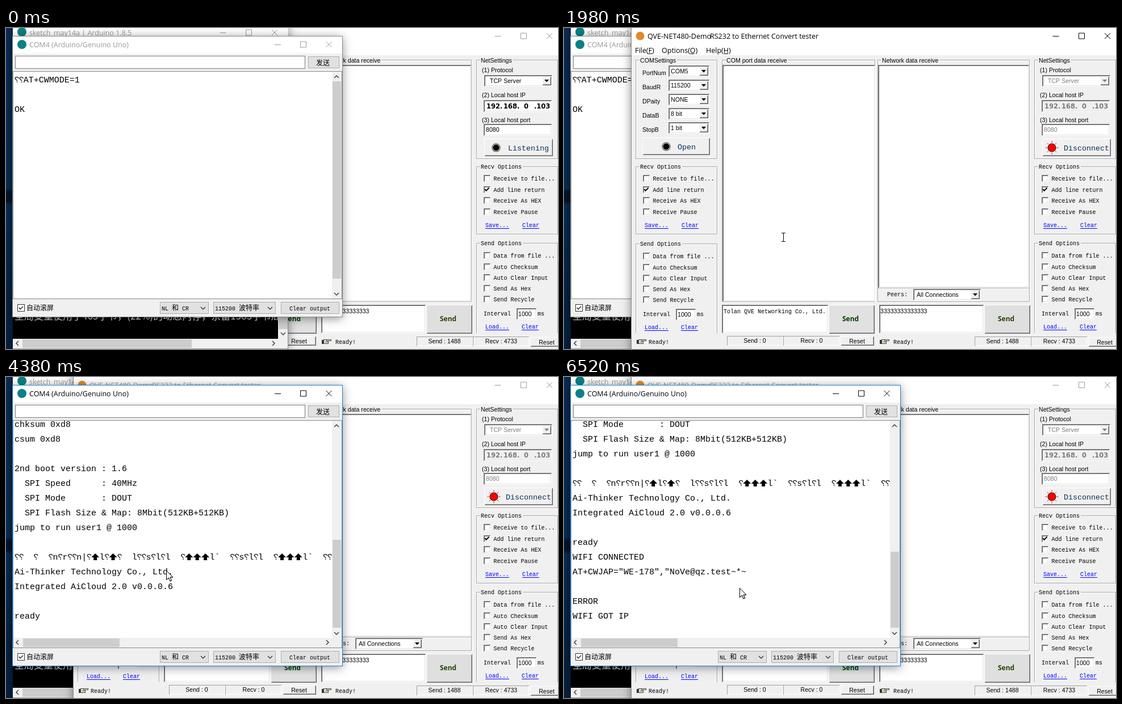
These frames come from a looping animation (972x566 px, 8000 ms). An HTML page with a canvas:

```html
<!DOCTYPE html>
<html lang="en">
<head>
<meta charset="utf-8">
<title>Serial monitor and network tester</title>
<style>
  html, body { margin: 0; width: 100%; height: 100%; overflow: hidden; background: #f0f0f0; }
  canvas { display: block; }
</style>
</head>
<body>
<canvas id="stage" width="972" height="566"></canvas>
<script>
const ctx = document.getElementById('stage').getContext('2d');
const LOOP = 8000, FACE = '#f0f0f0', GREY = '#9a9a9a', TEAL = '#0b8089';
const UI = '12.5px "Open Sans", sans-serif';
const SANS = '10.6px "Liberation Sans", sans-serif';
const MONO = '10px "Liberation Mono", monospace';
const MID = '13.33px "Liberation Mono", monospace';
const LOG = '15px "Liberation Mono", monospace';
const HEAVY = '11.5px "DejaVu Sans", sans-serif';
const cjk = size => size + 'px "Noto Sans CJK SC", "Noto Sans CJK", sans-serif';

const GO_LISTEN = 1140, LISTENING = 1220, BOOT = 2300, GO_MONITOR = 2610, RELEASED = 2680;

const bootLog = [
  'chksum 0xe8', 'load 0x3ffe8000, len 776, room 0', 'tail 8', 'chksum 0x84',
  'load 0x3ffe8310, len 632, room 0', 'tail 8', 'chksum 0xd8', 'csum 0xd8', '',
  '2nd boot version : 1.6', '  SPI Speed      : 40MHz', '  SPI Mode       : DOUT',
  '  SPI Flash Size & Map: 8Mbit(512KB+512KB)', 'jump to run user1 @ 1000', '',
  '¿¿  ¿  ¿n¿r¿¿n|¿^l¿^¿  l¿¿s¿l¿l  ¿^^^l`  ¿¿s¿l¿l  ¿^^^l`  ¿¿',
  'Ai-Thinker Technology Co., Ltd.', 'Integrated AiCloud 2.0 v0.0.0.6', '', 'ready',
  'WIFI CONNECTED', 'AT+CWJAP="WE-178","NoVe@qz.test~*~', '', 'ERROR', 'WIFI GOT IP'
];
// [time, lines received]
const arrivals = [[BOOT, 14], [RELEASED, 16], [3920, 20], [4990, 21], [5220, 24], [5520, 25]];

// start, end, steps, then [fraction, x, y] way points
const moves = [
  [70, 820, 11, [0, 800, 580], [0.6, 880, 330], [1, 903, 225]],
  [900, 980, 2, [0, 903, 225], [1, 904, 208]],
  [1750, 2530, 11, [0, 904, 208], [0.273, 385, 369], [0.7, 110, 300], [1, 54, 278]],
  [2830, 3600, 11, [0, 54, 278], [1, 406, 348]],
  [3690, 4470, 11, [0, 406, 348], [0.818, 282, 341], [1, 274, 341]],
  [4530, 4700, 3, [0, 274, 341], [1, 265, 341]],
  [4840, 5600, 11, [0, 265, 341], [0.42, 587, 385], [0.636, 550, 389], [1, 375, 383]],
  [5680, 6000, 5, [0, 375, 383], [1, 305, 373]],
  [6450, 6520, 2, [0, 305, 373], [1, 309, 372]]
];

function pointerAt(t) {
  const move = moves.filter(m => t >= m[0]).pop();
  if (!move) return null;
  const [start, end, steps, ...way] = move;
  const step = Math.floor((t - start) / (end - start) * (steps - 1) + 1e-6);
  const f = Math.min(1, (step + 1) / steps);
  const i = Math.max(1, way.findIndex(p => p[0] >= f - 1e-6));
  const [a, b] = [way[i - 1], way[i]];
  const k = Math.min(1, (f - a[0]) / (b[0] - a[0]));
  return [1, 2].map(n => Math.round(a[n] + (b[n] - a[n]) * k));
}

function rect(x, y, x2, y2, fill) {
  ctx.fillStyle = fill;
  ctx.fillRect(x, y, x2 - x, y2 - y);
}

function frame(x, y, x2, y2, color, fill) {
  rect(x, y, x2, y2, color);
  rect(x + 1, y + 1, x2 - 1, y2 - 1, fill);
}

function text(s, x, y, font, color = '#000', align = 'left') {
  ctx.font = font;
  ctx.fillStyle = color;
  ctx.textAlign = align;
  ctx.fillText(s, x, y);
}

function mixed(s, x, y) {
  for (const run of s.split(/([\u4e00-\u9fff]+)/)) {
    const han = /[\u4e00-\u9fff]/.test(run);
    text(run, x, y, han ? cjk(12) : MONO);
    x += run.length * (han ? 12 : 6);
  }
}

function path(points, color, width = 1, close = false) {
  ctx.beginPath();
  points.forEach(p => ctx.lineTo(p[0], p[1]));
  if (close) ctx.closePath();
  ctx.strokeStyle = color;
  ctx.lineWidth = width;
  ctx.stroke();
}

function disc(x, y, r, fill) {
  ctx.beginPath();
  ctx.arc(x, y, r, 0, 7);
  ctx.fillStyle = fill;
  ctx.fill();
}

function shadowed(x, y, x2, y2) {
  ctx.save();
  ctx.shadowColor = 'rgba(0,0,0,.45)';
  ctx.shadowBlur = 16;
  ctx.shadowOffsetY = 3;
  rect(x, y, x2, y2, '#fff');
  ctx.restore();
}

function bevel(x, y, x2, y2, light, dark, fill) {
  rect(x, y, x2, y2, light);
  rect(x + 1, y + 1, x2, y2, dark);
  rect(x + 1, y + 1, x2 - 1, y2 - 1, fill);
}

function sunken(x, y, x2, y2, fill = '#fff') {
  bevel(x, y, x2, y2, '#8c8c8c', '#fff', '#d8d8d8');
  bevel(x + 1, y + 1, x2 - 1, y2 - 1, '#5e5e5e', '#e3e3e3', fill);
}

function raised(x, y, x2, y2, fill = FACE) {
  bevel(x, y, x2, y2, '#fff', '#606060', fill);
  bevel(x + 1, y + 1, x2 - 1, y2 - 1, fill, '#a0a0a0', fill);
}

function group(x, y, x2, y2, label, font) {
  frame(x + 1, y + 1, x2 + 1, y2 + 1, '#fff', FACE);
  path([[x + .5, y + .5], [x2 - .5, y + .5], [x2 - .5, y2 - .5], [x + .5, y2 - .5]], '#a5a5a5', 1, true);
  if (!label) return;
  ctx.font = font;
  rect(x + 7, y - 4, x + 10 + ctx.measureText(label).width, y + 6, FACE);
  text(label, x + 8, y + (font === SANS ? 5 : 4), font);
}

function triangle(x, y, color = '#000') {
  ctx.beginPath();
  [[-4, -2], [4, -2], [0, 2.5]].forEach(p => ctx.lineTo(x + p[0], y + p[1]));
  ctx.fillStyle = color;
  ctx.fill();
}

function combo(x, y, x2, s, tx, color = '#000') {
  sunken(x, y, x2, y + 20);
  raised(x2 - 18, y + 2, x2 - 2, y + 18);
  triangle(x2 - 10, y + 10, color);
  text(s, tx, y + 14, SANS, color);
}

function chevron(x, y, dx, dy, size = 4) {
  const h = size / 2;
  const pts = dy ? [[x - size, y - dy * h], [x, y + dy * h], [x + size, y - dy * h]]
                 : [[x - dx * h, y - size], [x + dx * h, y], [x - dx * h, y + size]];
  path(pts, '#404040', 1.5);
}

function controls(x, y, gap, color) {
  path([[x - 5.5, y + .5], [x + 5.5, y + .5]], color);
  path([[x + gap - 5, y - 5], [x + gap + 5, y - 5], [x + gap + 5, y + 5], [x + gap - 5, y + 5]], color, 1, true);
  const c = x + 2 * gap;
  path([[c - 5, y - 5], [c + 5, y + 5]], color);
  path([[c - 5, y + 5], [c + 5, y - 5]], color);
}

function tick(x, y, color = '#000', width = 2) {
  path([[x - 3, y - 1], [x - 1, y + 2], [x + 4, y - 3]], color, width);
}

function desktop() {
  const g = ctx.createLinearGradient(0, 0, 0, 566);
  g.addColorStop(0, '#0a2f59');
  g.addColorStop(.5, '#07305a');
  g.addColorStop(.51, '#04162c');
  g.addColorStop(.54, '#04162c');
  g.addColorStop(.55, '#07305a');
  g.addColorStop(1, '#05203f');
  rect(0, 0, 972, 566, g);
}

function editor() {
  shadowed(12, -10, 497, 564);
  disc(28, 7, 8, TEAL);
  text('sketch_may14a | Arduino 1.8.5', 41, 13, UI, GREY);
  controls(382, 8, 45.5, GREY);
  rect(12, 45, 497, 566, FACE);
  rect(12, 480, 479, 548, '#000');
  ctx.save();
  ctx.beginPath();
  ctx.rect(12, 480, 467, 68);
  ctx.clip();
  text('全局变量使用了465字节，(22%)的动态内存，余留1583字节局部变量。', 15, 514, cjk(17), '#e8e8e8');
  ctx.restore();
  rect(480, 480, 496, 531, '#cdcdcd');
  chevron(488, 539, 0, 1);
  rect(29, 549, 327, 564, '#cdcdcd');
  chevron(20, 556, -1, 0);
  chevron(471, 556, 1, 0);
  rect(496, 14, 497, 566, '#8a8a8a');
  rect(12, 565, 497, 566, '#9a9a9a');
}

function logLine(s, x, y) {
  for (const ch of s) {
    if (ch === '¿') {
      ctx.save();
      ctx.translate(x + 8.5, y);
      ctx.scale(-1, 1);
      text('?', 0, 0, LOG);
      ctx.restore();
      x += 7.9;
    } else if (ch === '^') {
      ctx.beginPath();
      [[7, -11], [14, -4], [10, -4], [10, 1], [4, 1], [4, -4], [0, -4]].forEach(p => ctx.lineTo(x + p[0], y + p[1]));
      ctx.fillStyle = '#000';
      ctx.fill();
      x += 14.4;
    } else {
      text(ch, x, y, LOG);
      x += 9;
    }
  }
}

function monitor(t) {
  const active = t >= GO_MONITOR, ink = active ? '#000' : GREY;
  const arrival = arrivals.filter(a => t >= a[0]).pop();
  const count = arrival ? arrival[1] : 0;
  const wide = count > 14;

  shadowed(12, 14, 592, 509);
  frame(11, 14, 593, 510, active ? '#1883d7' : '#8a8a8a', FACE);
  rect(12, 15, 592, 45, '#fff');
  disc(28, 29, 8, TEAL);
  text('COM4 (Arduino/Genuino Uno)', 41, 34, UI, ink);
  controls(478.5, 29, 45, ink);
  frame(16, 49, 527, 72, '#7a7a7a', '#fff');
  frame(532, 50, 587, 71, '#adadad', '#e1e1e1');
  text('发送', 546, 66, cjk(12));

  frame(12, 76, 592, 478, '#828790', '#fff');
  ctx.save();
  ctx.beginPath();
  ctx.rect(13, 77, 561, wide ? 383 : 400);
  ctx.clip();
  const lines = count ? bootLog.slice(0, count) : ['¿¿AT+CWMODE=1', '', 'OK'];
  const last = wide ? 421 : count ? 411 : 143;
  lines.forEach((s, i) => logLine(s, 15, last + 5 - (lines.length - 1 - i) * 26));
  ctx.restore();

  rect(574, 77, 591, 477, FACE);
  const top = wide ? 287 + (count - 20) * 4.2 : count ? 259 : 94;
  rect(575, Math.round(top), 590, count && !wide ? 459 : 442, '#cdcdcd');
  chevron(582, 86, 0, -1);
  chevron(582, wide ? 452 : 469, 0, 1);
  if (wide) {
    rect(13, 460, 591, 477, FACE);
    rect(30, 461, 200, 476, '#cdcdcd');
    chevron(20, 468, -1, 0);
    chevron(566, 468, 1, 0);
  }

  frame(20, 487, 33, 500, '#333', '#fff');
  tick(26, 494, '#222', 1.4);
  text('自动滚屏', 36, 498, cjk(12));
  frame(271, 483, 357, 504, '#adadad', '#e1e1e1');
  mixed('NL 和 CR', 274, 498);
  chevron(347, 494, 0, 1);
  frame(365, 483, 475, 504, '#adadad', '#e1e1e1');
  mixed('115200 波特率', 368, 498);
  chevron(465, 494, 0, 1);
  frame(484, 483, 587, 504, '#adadad', '#e1e1e1');
  mixed('Clear output', 499, 498);
}

function link(s, x, y) {
  text(s, x, y, MONO, '#00f');
  rect(x, y + 2, x + s.length * 6, y + 3, '#00f');
}

function option(s, x, y, checked) {
  sunken(x, y - 6, x + 12, y + 6);
  if (checked) tick(x + 5.5, y);
  text(s, x + 17.5, y + 4, MONO);
}

function optionGroups(dx, dy) {
  group(126 + dx, 244, 270 + dx, 364, 'Recv Options', MONO);
  ['Receive to file...', 'Add line return', 'Receive As HEX', 'Receive Pause']
    .forEach((s, i) => option(s, 139 + dx, Math.round(265 + i * 19.6), i === 1));
  link('Save...', 142 + dx, 351);
  link('Clear', 207 + dx, 351);

  group(126 + dx, 380 + dy, 270 + dx, 539, 'Send Options', MONO);
  rect(126 + dx, 538, 272 + dx, 541, FACE);
  ['Data from file ...', 'Auto Checksum', 'Auto Clear Input', 'Send As Hex', 'Send Recycle']
    .forEach((s, i) => option(s, 139 + dx, Math.round(402.4 + i * 19.2) + dy));
  text('Interval', 139 + dx, 508 + dy, MONO);
  sunken(197 + dx, 495 + dy, 232 + dx, 515 + dy);
  text('1000', 200 + dx, 509 + dy, SANS);
  text('ms', 234 + dx, 508 + dy, MONO);
  link('Load...', 142 + dx, 531 + dy);
  link('Clear', 206 + dx, 531 + dy);
}

function hand(x, y) {
  rect(x, y + 3, x + 4, y + 10, '#333');
  frame(x + 3, y + 2, x + 12, y + 10, '#444', '#eee0c0');
  frame(x + 8, y + 2, x + 17, y + 5, '#444', '#fff');
  path([[x + 6, y + 6.5], [x + 12, y + 6.5]], '#555');
}

function statusBar(x, y, hint, sent, received) {
  hand(x === 287 ? 128 : 556, 547);
  text(hint, x === 287 ? 149 : 580, 557, MONO);
  bevel(x, y, x + 99, y + 17, '#a0a0a0', '#fff', FACE);
  bevel(x + 99, y, x + 198, y + 17, '#a0a0a0', '#fff', FACE);
  text('Send : ' + sent, x + 49, y + 12, SANS, '#000', 'center');
  text('Recv : ' + received, x + 149, y + 12, SANS, '#000', 'center');
}

function lamp(x, y, on) {
  if (!on) {
    disc(x, y, 7.5, '#000');
    disc(x, y, 6.7, '#fff');
    disc(x, y, 5.7, '#000');
    return;
  }
  for (let i = 0; i < 8; i++) {
    const c = Math.cos(i * Math.PI / 4), s = Math.sin(i * Math.PI / 4);
    path([[x + 8.5 * c, y + 8.5 * s], [x + 11.5 * c, y + 11.5 * s]], '#b02020');
  }
  disc(x, y, 7.5, '#400');
  disc(x, y, 6.5, '#f00');
}

function tester(t) {
  const active = t >= GO_LISTEN && t < GO_MONITOR;
  const ink = active ? '#000' : GREY;
  const open = t >= LISTENING, fieldInk = open ? '#7c7c7c' : '#000';

  shadowed(118, -10, 990, 580);
  disc(134, 14, 7.5, '#e08a2c');
  text('QVE-NET480-Demo', 147, 19, UI, ink);
  text('RS232 to Ethernet Convert tester', 257, 19, UI, ink);
  controls(866, 14, 45.5, ink);
  [['File(F)', 125, 147], ['Options(O)', 172, 222], ['Help(H)', 250, 281]].forEach(([s, x, u]) => {
    text(s, x, 44, UI);
    rect(u, 45, u + 8, 46, '#000');
  });
  rect(118, 48, 972, 566, FACE);
  rect(118, 0, 119, 566, '#8a8a8a');

  group(126, 56, 270, 231, 'COMSettings', SANS);
  [['PortNum', 'COM5'], ['BaudR', '115200'], ['DPaity', 'NONE'], ['DataB', '8 bit'], ['StopB', '1 bit']]
    .forEach(([name, value], i) => {
      text(name, 138, 83 + i * 25, SANS);
      combo(184, 66 + i * 25, 256, value, 188);
    });
  raised(138, 193, 257, 224);
  lamp(180, 209, false);
  text('Open', 200, 214, MID, '#0a2f58');

  group(828, 56, 972, 231, 'NetSettings', SANS);
  text('(1) Protocol', 838, 78, SANS);
  combo(842, 83, 962, 'TCP Server', 852, fieldInk);
  text('(2) Local host IP', 838, 122, SANS);
  sunken(841, 127, 961, 148, open ? FACE : '#fff');
  [['192.', 846], ['168.', 876], ['0', 912], ['.103', 930]]
    .forEach(([s, x]) => text(s, x, 142, 'bold ' + HEAVY, fieldInk));
  text('(3) Local host port', 838, 166, SANS);
  sunken(841, 169, 961, 190);
  text('8080', 845, 183, SANS, fieldInk);
  raised(842, 195, 963, 226);
  lamp(open ? 859 : 863, 211, open);
  text(open ? 'Disconnect' : 'Listening', open ? 880 : 884, 216, MID, '#0a2f58');

  optionGroups(0, 0);
  optionGroups(702, -1);

  group(278, 56, 548, 483, 'COM port data receive', SANS);
  sunken(279, 65, 548, 482);
  group(552, 56, 820, 483, 'Network data receive', SANS);
  sunken(553, 65, 819, open ? 458 : 482);
  if (open) {
    group(552, 458, 820, 483);
    text('Peers:', 569, 473, MONO);
    combo(615, 460, 734, 'All Connections', 621);
  }
  const caret = (t >= GO_LISTEN && t < 1600) || (t >= 2140 && t < GO_MONITOR);
  if (caret) rect(557, 68, 558, 84, '#000');

  sunken(278, 488, 465, 538);
  text('Tolan QVE Networking Co., Ltd.', 281, 503, MONO);
  sunken(555, 488, 739, 538);
  text('3'.repeat(14), 557, 503, SANS);
  raised(466, 488, 547, 539, '#e1e1e1');
  text('Send', 490, 517, 'bold 12px "Open Sans", sans-serif', '#003c00');
  raised(740, 488, 821, 539, '#dfdfdf');
  text('Send', 764, 517, 'bold 12px "Open Sans", sans-serif', '#264400');

  statusBar(287, 543, 'Ready!', 0, 0);
  raised(487, 543, 546, 560);
  text('Reset', 516, 556, SANS, '#000', 'center');
  const hovering = t >= 670 && t < 1830;
  statusBar(723, 544, hovering ? 'NetSettings' : 'Ready!', 1488, 4733);
  raised(923, 545, 985, 562);
  text('Reset', 952, 558, SANS, '#000', 'center');
}

function pointer(t) {
  const at = pointerAt(t);
  if (!at) return;
  const [x, y] = at;
  const clicking = (t >= GO_LISTEN && t < LISTENING) || (t >= GO_MONITOR && t < RELEASED);
  if (clicking) disc(x, y + 1, 12, 'rgba(255,128,92,.78)');
  const inEdit = (x > 280 && x < 547 && y < 481) || (x > 554 && x < 818 && y < 457);
  if (t >= LISTENING && t < GO_MONITOR && inEdit && y > 66) {
    path([[x + .5, y - 7], [x + .5, y + 7]], '#000');
    path([[x - 3, y - 7.5], [x + 4, y - 7.5]], '#000');
    path([[x - 3, y + 7.5], [x + 4, y + 7.5]], '#000');
    return;
  }
  const shape = [[0, 0], [0, 16], [4, 12.5], [6.5, 18.5], [9, 17.5], [6.5, 11.5], [11.5, 11.5]]
    .map(p => [x + .5 + p[0], y + .5 + p[1]]);
  path(shape, '#000', 1, true);
  ctx.fillStyle = '#fff';
  ctx.fill();
  path(shape, '#000', 1, true);
}

function draw(now) {
  const t = now % LOOP;
  desktop();
  const stack = t < GO_LISTEN ? [tester, editor, monitor]
    : t < GO_MONITOR ? [editor, monitor, tester] : [editor, tester, monitor];
  stack.forEach(layer => layer(t));
  pointer(t);
}

const began = performance.now();
function tickFrame() {
  draw(performance.now() - began);
  requestAnimationFrame(tickFrame);
}
tickFrame();
</script>
</body>
</html>
```
